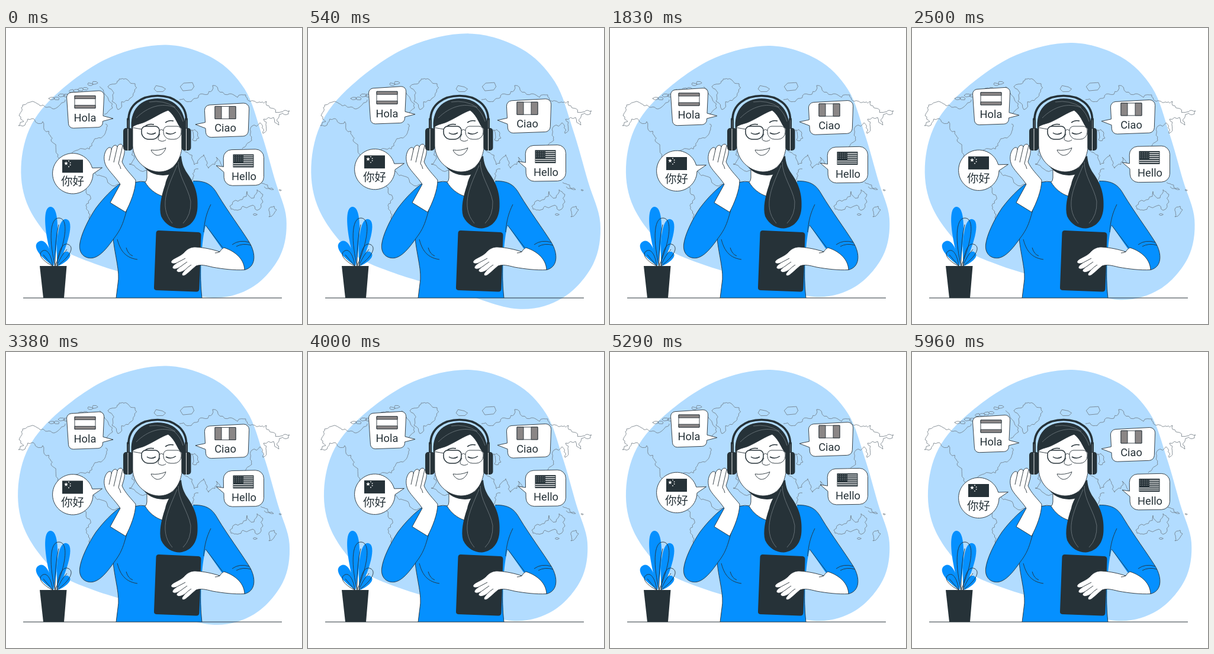
Recreate the animation shown at these times as an HTML page with a canvas. Size 500x500 px, loop 6 s.

```html
<!DOCTYPE html>
<html lang="en">
<head>
<meta charset="utf-8">
<title>Interpreter</title>
<style>
html, body { margin: 0; width: 100%; height: 100%; overflow: hidden; background: #fff; }
canvas { display: block; width: 100%; height: 100%; }
</style>
</head>
<body>
<canvas id="stage"></canvas>
<script>
const SIZE = 500, LOOP = 6000, STEP = LOOP / 144;
const DARK = '#263238', BLUE = '#0590ff', PALE = '#b2dcff', GREY = '#8a8686', MAP = '#6c7880', SHINE = '#7f898e';
const LATIN = 'Roboto, sans-serif', HAN = '"Noto Sans CJK SC", "Noto Sans CJK", sans-serif';
const canvas = document.getElementById('stage');
const ctx = canvas.getContext('2d');
const ratio = window.devicePixelRatio || 1;
canvas.width = canvas.height = SIZE * ratio;

function shape(d, fill, stroke, width = 0.9) {
  const p = new Path2D(d);
  if (fill) { ctx.fillStyle = fill; ctx.fill(p); }
  if (stroke) { ctx.strokeStyle = stroke; ctx.lineWidth = width; ctx.stroke(p); }
}
const line = (d, color = DARK, width = 0.9) => shape(d, null, color, width);
function box(x, y, w, h, fill, stroke) {
  if (fill) { ctx.fillStyle = fill; ctx.fillRect(x, y, w, h); }
  if (stroke) { ctx.strokeStyle = stroke; ctx.lineWidth = 0.9; ctx.strokeRect(x, y, w, h); }
}
function dot(x, y, r, fill) {
  ctx.fillStyle = fill;
  ctx.beginPath();
  ctx.arc(x, y, r, 0, 7);
  ctx.fill();
}
function label(text, x, y, size = 18.3, family = LATIN) {
  ctx.font = size + 'px ' + family;
  ctx.textAlign = 'center';
  ctx.fillStyle = DARK;
  ctx.fillText(text, x, y);
}
const points = text => text.split(' ').map(s => s.split(',').map(Number));

// Closed smooth curve through a few points
function smooth(text) {
  const p = points(text), n = p.length;
  let d = 'M' + p[0];
  for (let i = 0; i < n; i++) {
    const [a, b, c, e] = [p[(i + n - 1) % n], p[i], p[(i + 1) % n], p[(i + 2) % n]];
    d += `C${b[0] + (c[0] - a[0]) / 6},${b[1] + (c[1] - a[1]) / 6} ` +
      `${c[0] - (e[0] - b[0]) / 6},${c[1] - (e[1] - b[1]) / 6} ${c}`;
  }
  return d + 'Z';
}
const blob = smooth('270,30 350,53 402,104 430,178 453,257 472,322 461,385 414,437 345,454 ' +
  '250,427 150,397 88,366 40,303 27,235 45,163 97,103 178,50');

// Coastlines: a few key points, legs split by seeded midpoint shifts
let seed = 11;
function rand() { seed = (seed * 16807) % 2147483647; return seed / 2147483647 - 0.5; }
function rough(a, b) {
  const dx = b[0] - a[0], dy = b[1] - a[1];
  if (Math.hypot(dx, dy) < 5) return 'L' + b;
  const k = rand() * 0.55;
  const mid = [(a[0] + b[0]) / 2 - dy * k, (a[1] + b[1]) / 2 + dx * k];
  return rough(a, mid) + rough(mid, b);
}
const coast = text => points(text).map((p, i, all) => i ? rough(all[i - 1], p) : 'M' + p).join('');
function island(x, y, r) {
  const ring = [0, 1, 2, 3, 4, 5].map(i => {
    const k = r * (1 + rand() * 0.6);
    return [x + k * Math.cos(i * Math.PI / 3), y + 0.5 * k * Math.sin(i * Math.PI / 3)];
  });
  return 'M' + ring.join('L') + 'Z';
}
let world = [
  '100,121 62,130 28,130 22,148 30,158 21,165 44,153 62,158 75,182 88,214 100,232',
  '168,162 170,171 150,187 134,205 118,207 108,221',
  '172,99 206,88 218,94 209,119 189,138 179,124 172,99',
  '158,99 167,112 180,135 166,146',
  '146,242 165,251 192,264 180,292',
  '128,262 143,286 141,326 156,312',
  '293,121 318,119 341,112 349,97 378,111 405,113 440,124 479,140 462,146 461,164 452,151 ' +
  '435,154 434,178 429,160 415,166 415,190 399,204',
  '300,207 318,231 334,214 342,237 355,218 366,234',
  '214,207 208,230 240,240',
  '325,238 312,258',
  '313,172 326,186 315,189 313,172',
  '378,301 384,293 407,276 419,287 424,273 434,294 424,308 400,301 380,306 378,301',
  '453,301 457,307 444,319 453,301',
  '430,261 452,273 436,268'
].map(coast).join('');
for (let i = 0; i < 10; i++) world += island(78 + i * 8, 120 - i * 3 + rand() * 8, 5);
world += island(260, 103, 11) + island(307, 99, 13) + island(421, 315, 3) + island(463, 274, 2);

function drawBlob(scale) {
  ctx.save();
  ctx.translate(249.5, 242);
  ctx.scale(scale, scale);
  ctx.translate(-249.5, -242);
  shape(blob, PALE);
  ctx.restore();
}

// Four corners are rounded; the three tail points stay sharp
function bubble(corners, r, tail) {
  const [a, b, c, d] = points(corners), t = points(tail);
  const right = t[1][0] > a[0];
  const ring = right ? [a, b, ...t, c, d] : [a, b, c, d, ...t];
  ctx.beginPath();
  ctx.moveTo((a[0] + b[0]) / 2, (a[1] + b[1]) / 2);
  for (let i = 1; i <= ring.length; i++) {
    const p = ring[i % ring.length], q = ring[(i + 1) % ring.length];
    if (t.includes(p)) ctx.lineTo(...p);
    else ctx.arcTo(...p, ...q, r);
  }
  ctx.closePath();
  ctx.fillStyle = '#fff';
  ctx.fill();
  ctx.strokeStyle = DARK;
  ctx.lineWidth = 0.9;
  ctx.stroke();
}

function drawBubbles() {
  bubble('102,110 166,106 163,168 106,170', 8, '164,149 181,153.5 163.5,158');
  box(116, 115, 35, 21, '#fff', DARK);
  for (const y of [115, 131]) box(116, y, 35, 5, GREY, DARK);
  label('Hola', 133.5, 158.3);

  bubble('335,131 411,127 409,183 338,185.5', 9, '337,170 320,163.5 336.5,160');
  box(353, 133, 35, 21, '#fff', DARK);
  for (const x of [353, 377]) box(x, 133, 11, 21, GREY, DARK);
  label('Ciao', 370.5, 175.8);

  bubble('367,206.5 435.5,205 435.5,266 368.5,267', 14, '368,244 355,233 367.5,235');
  box(383.5, 214, 35, 22, DARK);
  for (let i = 0; i < 6; i++) {
    const x = i < 4 ? 401 : 384;
    box(x, 216 + i * 3.3, 417.5 - x, 1.3, '#fff');
  }
  for (let i = 0; i < 20; i++) dot(386 + i % 5 * 3.2, 216.3 + (i / 5 | 0) * 2.9, 0.5, '#fff');
  label('Hello', 402, 257.5);

  shape('M145.7,237A34.2,34.2 0 1 0 147,247L162.5,236.5Z', '#fff', DARK);
  box(95, 223, 35, 22, DARK);
  let star = '';
  for (let i = 0; i < 10; i++) {
    const a = i * Math.PI / 5 - Math.PI / 2, r = i % 2 ? 1.5 : 3.6;
    star += (i ? 'L' : 'M') + (101.5 + r * Math.cos(a)) + ',' + (229.3 + r * Math.sin(a));
  }
  shape(star + 'Z', '#fff');
  for (let i = 0; i < 4; i++) {
    const a = (i - 1.5) * 0.62;
    dot(101.5 + 7.5 * Math.cos(a), 230 + 6 * Math.sin(a), 0.9, '#fff');
  }
  label('你好', 112.5, 267, 19.5, HAN);
}

// Leaf from base to tip, widest near the tip
function leaf(bx, by, tx, ty, w, fill, stroke) {
  const dx = tx - bx, dy = ty - by, len = Math.hypot(dx, dy);
  const side = k => {
    const nx = -dy / len * w * k, ny = dx / len * w * k;
    return [[bx + dx * 0.45 + nx * 0.7, by + dy * 0.45 + ny * 0.7], [tx + nx, ty + ny]];
  };
  const [a, b] = side(1), [c, d] = side(-1);
  shape(`M${bx},${by}C${a} ${b} ${tx},${ty}C${d} ${c} ${bx},${by}Z`, fill, stroke);
}
function drawPlant() {
  leaf(81, 402, 75, 302, 16, BLUE);
  leaf(87, 402, 102, 323, 15, BLUE);
  leaf(80, 402, 55, 361, 15, BLUE);
  leaf(88, 402, 106, 379, 10, BLUE);
  leaf(83, 402, 90, 321, 18, null, DARK);
  leaf(79, 402, 61, 377, 11, null, DARK);
  leaf(86, 402, 106, 366, 13, null, DARK);
  line('M83,402Q82,360 89,332M79,402L63,383M86,402Q93,384 103,374');
  shape('M57,402H102.5L98,456H63Z', DARK);
}

function drawBody() {
  shape('M236,260L218,260L190,300L200,315C196,332 188,346 181,356C184,385 193,412 189,432L186,456H331' +
    'C328,420 329,370 336,338L352,280L318,258L290,285L264,284C252,280 242,272 236,260Z', BLUE);
  line('M236,260Q228,258 219,260.5M181,356C184,385 193,412 189,432L186,456M331,456C328,430 327,400 330,370');
  line('M188,357C192,372 199,388 222,391M203,371Q206,382 214,385');

  // Right arm
  shape('M316,258.5C340,258 349,266 358,282C375,310 396,338 411,362C423,382 422,404 403,408.5L364,372' +
    'L337,333L330,300Z', BLUE);
  line('M316,258.5C340,258 349,266 358,282C375,310 396,338 411,362C423,382 422,404 403,408.5');
  line('M346,298C339,312 335,326 334,345M337,333L366,371M382,366Q394,357 411,362M389,369Q400,363 414,367');

  // Neck and ponytail
  shape('M238,236V253Q238,258 235,260.5C242,272 252,280 264,284H292V232Z', '#fff');
  line('M238,240V253Q238,258 235,260.5C242,272 252,280 264,284');
  shape('M230,230C243,246 272,248 289,229L292,240C275,254 242,252 230,230Z', DARK);
  shape('M288,220C286,236 273,245 269,264C262,284 258,304 262,318C269,333 283,339 294,338.5' +
    'C313,336 323,322 323.5,302C325,275 315,258 306,245C300,236 297,228 296,216Z', DARK);
  line('M291,226C291,250 308,270 312,293Q313,316 299,330M289,232C277,262 255,300 281,330', SHINE, 0.7);

  // Left arm
  shape('M194,262C180,271 164,288 152,304C139,323 126,350 124.5,366C123,381 133,390 146,388.5' +
    'C162,386 176,364 187,349C196,336 199,325 203,311L210,284Z', BLUE, DARK);
  shape('M176,295L193,264C186,253 175,243 169,233C164,223 165,211 171,204C175,200 179,202 178,206' +
    'C179,199 186,195 188,201C190,195 196,195 197,199C201,201 201,208 199,216L196,226' +
    'C201,238 212,248 219,257C219,274 210,296 202,311Z', '#fff', DARK);
  line('M178,206L174,224M188,201L182,227M197,199L190,229Q193,233 194,238');
}

function drawHead() {
  shape('M212,172C208,138 228,119 256,119C287,119 306,140 303,180H214Z', DARK);
  shape('M214,167V199C215,223 235,242 258,243C280,243 293,228 297,204V170C290,166 288,150 274,139' +
    'C264,142 249,152 236,158C228,162 220,162 214,167Z', '#fff', DARK);
  line('M220,152C240,132 264,126 284,134Q295,144 299,158M242,125Q266,121 286,134', SHINE, 0.7);

  // Face
  line('M235,166Q241,161 250,163M269,160Q275,155 283,157', DARK, 1.5);
  line('M238,177Q245,182 253,177M270,177Q278,182 287,176', DARK, 1.5);
  for (const x of [229, 266]) {
    ctx.beginPath();
    ctx.roundRect(x, 166, 30, 22, [7, 7, 12, 12]);
    ctx.stroke(), ctx.lineWidth = 0.9;
  }
  line('M259,173Q262.5,170 266,173M229,171L215,168.5M296,170L299,169');
  line('M260,179C258,184 255,188 259,190Q265,193 270,189');
  shape('M245,206Q258,208 270,202.5C267,212 260,216 254,215Q247,212 245,206Z', '#fff', DARK);

  // Headphones
  ctx.lineCap = 'round';
  line('M207,155C207,130 228,114.5 256,114.5C284,114.5 304.5,130 304.5,155', DARK, 3.6);
  line('M206.5,154V172M304.5,154V172', DARK, 5);
  line('M206.5,156V172M304.5,156V172', SHINE, 0.7);
  ctx.lineCap = 'butt';
  for (const x of [198, 296.5]) {
    ctx.fillStyle = DARK;
    ctx.beginPath();
    ctx.roundRect(x, 169, 16, 38, 5);
    ctx.fill();
  }
  line('M206,170V207M304.5,170V207', '#fff');
}

function drawTablet() {
  shape('M258,342L325,345Q329.5,345.5 329.5,350L326.5,441Q326,445.5 321.5,445.5L254,443Q249.5,442.5 250,438' +
    'L253.5,346Q254,342 258,342Z', DARK);
  shape('M403,408.5C386,409.5 366,407 349,404C337,401 329,399 321,402C316,406 309,413 303,417.5' +
    'C298,420 296,417 298,414L302,409C297,412 292,414 289,411.5Q286,409 292,405C287,408 281,408 281,404' +
    'Q282,401 288,397C283,399 278,398 279,394C282,389 294,386 300,380C307,372 313,370 320,370' +
    'C336,371 349,374 361,378Q364,373 368,371C384,376 402,388 403,408.5Z', '#fff', DARK);
  line('M302,409Q308,403 313,400M292,405L306,395M288,397L303,389M361,378Q357,380 353,380');
}

// Straight rise to 1 at the peak, then straight fall to 0
const beat = (t, peak, rise, fall) => Math.max(0, 1 - (t < peak ? (peak - t) / rise : (t - peak) / fall));
const pulse = t => 1 + 0.1 * (beat(t, 600, 600, 1200) + beat(t, 3000, 600, 600));
const float = t => -10 * beat(t % 1500, 750, 750, 750);

function render(t) {
  ctx.setTransform(ratio, 0, 0, ratio, 0, 0);
  ctx.fillStyle = '#fff';
  ctx.fillRect(0, 0, SIZE, SIZE);
  ctx.lineJoin = 'round';
  drawBlob(pulse(t));
  line(world, MAP, 0.8);
  ctx.save();
  ctx.translate(0, float(t));
  drawBubbles();
  ctx.restore();
  drawPlant();
  drawBody();
  drawHead();
  drawTablet();
  line('M29,456H466', DARK, 1);
}

// 24 pictures per second
const start = performance.now();
function tick() {
  const t = (performance.now() - start) % LOOP;
  render((Math.floor((t + 5) / STEP) + 1) * STEP % LOOP);
  requestAnimationFrame(tick);
}
tick();
</script>
</body>
</html>
```
